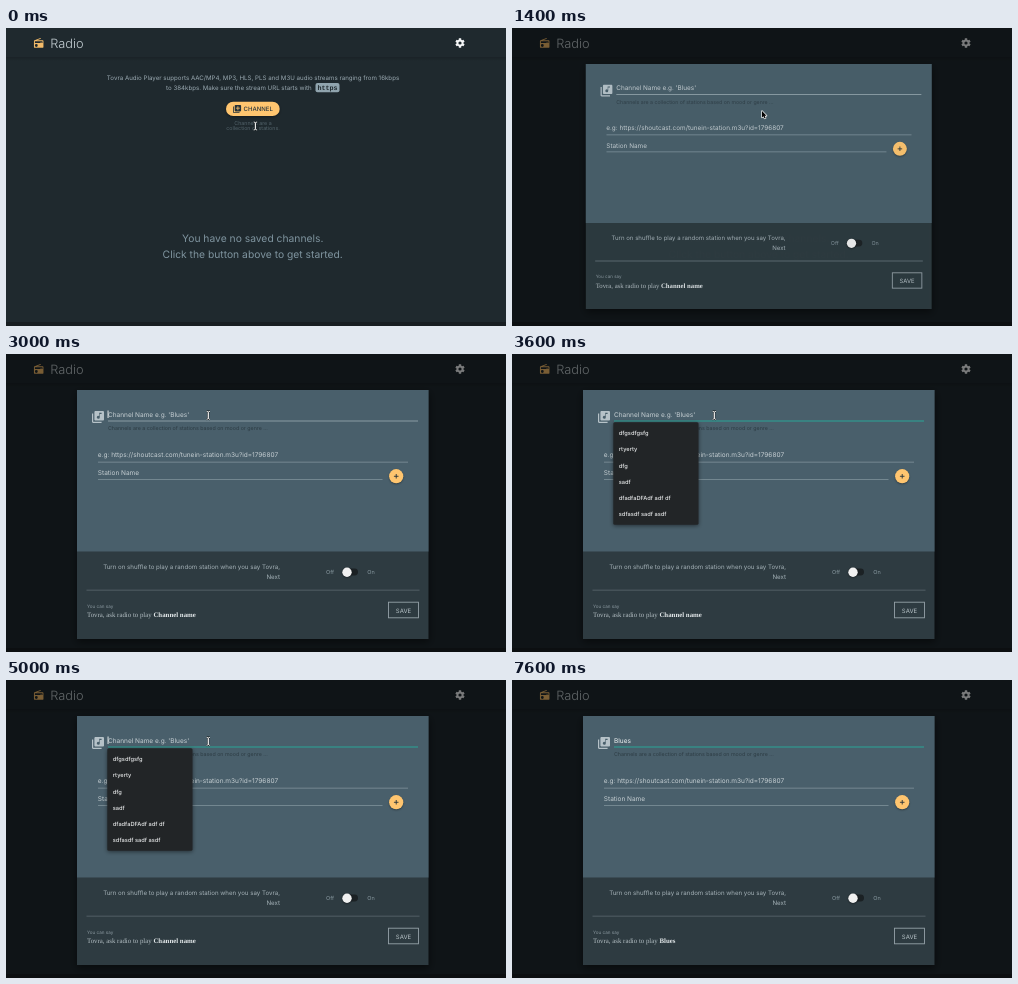
Recreate the animation shown at these times as an HTML page with a canvas. Size 500x298 px, loop 8 s.

```html
<!DOCTYPE html>
<html lang="en">
<head>
<meta charset="utf-8">
<title>Radio</title>
<style>
  html, body { margin: 0; width: 100%; height: 100%; overflow: hidden; background: #1f292e; }
  canvas { display: block; width: 500px; height: 298px; }
</style>
</head>
<body>
<canvas id="stage"></canvas>
<script>
const W = 500, H = 298, LOOP = 8000, STEP = 200;
const SANS = 'Inter, sans-serif';
const SERIF = '"Liberation Serif", serif';
const MONO = '"Liberation Mono", monospace';
const AMBER = '#ffc56f';

const canvas = document.getElementById('stage');
const ctx = canvas.getContext('2d');
const dpr = window.devicePixelRatio || 1;
canvas.width = Math.round(W * dpr);
canvas.height = Math.round(H * dpr);
ctx.textRendering = 'geometricPrecision';

const icons = {
  radio: 'M3.2 6.2C2.5 6.4 2 7.2 2 8v12c0 1.1.9 2 2 2h16c1.1 0 2-.9 2-2V8c0-1.1-.9-2-2-2H8.3l8.3-3.3L15.9 1zM7 20a3 3 0 1 1 0-6 3 3 0 0 1 0 6zm13-8h-2v-2h-2v2H4V8h16z',
  add: 'M4 6H2v14c0 1.1.9 2 2 2h14v-2H4zm16-4H8c-1.1 0-2 .9-2 2v12c0 1.1.9 2 2 2h12c1.1 0 2-.9 2-2V4c0-1.1-.9-2-2-2zm-1 9h-4v4h-2v-4H9V9h4V5h2v4h4z',
  music: 'M4 6H2v14c0 1.1.9 2 2 2h14v-2H4zm16-4H8c-1.1 0-2 .9-2 2v12c0 1.1.9 2 2 2h12c1.1 0 2-.9 2-2V4c0-1.1-.9-2-2-2zm-2 5h-3v5.5a2.5 2.5 0 1 1-1-2V5h4z',
  arrow: 'M0 0v9l2-1.8 1.5 3.2 1.6-.7-1.5-3.1h2.8z'
};
for (const name in icons) icons[name] = new Path2D(icons[name]);

function text(str, x, y, size, color, { align = 'left', weight = 400, family = SANS } = {}) {
  ctx.font = `${weight} ${size}px ${family}`;
  ctx.textAlign = align;
  ctx.fillStyle = color;
  ctx.fillText(str, x, y);
  return ctx.measureText(str).width;
}

function rect(x, y, w, h, color, radius = 0) {
  ctx.fillStyle = color;
  ctx.beginPath();
  ctx.roundRect(x, y, w, h, radius);
  ctx.fill();
}

function disc(x, y, r, color) {
  ctx.fillStyle = color;
  ctx.beginPath();
  ctx.arc(x, y, r, 0, Math.PI * 2);
  ctx.fill();
}

function icon(name, x, y, size, color) {
  ctx.save();
  ctx.translate(x, y);
  ctx.scale(size / 24, size / 24);
  ctx.fillStyle = color;
  ctx.fill(icons[name], 'evenodd');
  ctx.restore();
}

function shadow(blur, dy, color, draw) {
  ctx.save();
  ctx.shadowBlur = blur * dpr;
  ctx.shadowOffsetY = dy * dpr;
  ctx.shadowColor = color;
  draw();
  ctx.restore();
}

function gear(x, y, color) {
  const teeth = 6;
  ctx.beginPath();
  for (let i = 0; i < teeth; i++) {
    const a = i * Math.PI * 2 / teeth;
    for (const [da, r] of [[-.38, 3.5], [-.24, 4.8], [.24, 4.8], [.38, 3.5]]) {
      ctx.lineTo(x + r * Math.cos(a + da + Math.PI / 6 * 3), y + r * Math.sin(a + da + Math.PI / 6 * 3));
    }
  }
  ctx.closePath();
  ctx.moveTo(x + 1.6, y);
  ctx.arc(x, y, 1.6, 0, Math.PI * 2);
  ctx.fillStyle = color;
  ctx.fill('evenodd');
}

function drawPage() {
  rect(0, 0, W, H, '#1f292e');
  const fade = ctx.createLinearGradient(0, 29, 0, 33);
  fade.addColorStop(0, 'rgba(0,0,0,.16)');
  fade.addColorStop(1, 'rgba(0,0,0,0)');
  rect(0, 29, W, 4, fade);
  rect(0, 294, W, 4, '#181e22');

  icon('radio', 27, 9.4, 11.4, '#f3bb69');
  text('Radio', 44.3, 19.5, 12.8, '#c3cdd2', { weight: 300 });
  gear(454, 15, '#f4f6f7');

  const center = { align: 'center' };
  text('Tovra Audio Player supports AAC/MP4, MP3, HLS, PLS and M3U audio streams ranging from 16kbps',
    247, 52, 6.18, '#9aa9b1', center);
  text('to 384kbps. Make sure the stream URL starts with', 160, 62, 6.18, '#9aa9b1');
  rect(309.5, 55, 24, 9.3, '#90a4ae', 2);
  text('https', 321.5, 62, 6.7, '#1f292e', { align: 'center', weight: 700, family: MONO });

  shadow(3, 1, 'rgba(0,0,0,.4)', () => rect(220, 73.7, 53.7, 14.4, AMBER, 7.2));
  icon('add', 226.3, 76.2, 9.6, '#263238');
  text('CHANNEL', 237.6, 83.2, 6, '#2b363b', { weight: 500 });
  text('Channels are a', 247, 97.3, 5.3, '#53636b', center);
  text('collection of stations.', 247, 102, 5.3, '#53636b', center);

  text('You have no saved channels.', 246.7, 213.5, 10.3, '#7f949f', center);
  text('Click the button above to get started.', 246.7, 230, 10.3, '#7f949f', center);
}

function drawDialog(state) {
  shadow(8, 3, 'rgba(0,0,0,.5)', () => rect(71, 36, 351.5, 249, '#2e3b41'));
  rect(71, 36, 351.5, 161.5, '#495f6b');

  icon('music', 84.8, 55.8, 14.4, '#b6c2c8');
  let caretX = 102;
  if (state.value) {
    caretX += text(state.value, 102, 62.6, 6.5, '#f2f5f6') + .3;
  } else {
    text("Channel Name e.g. 'Blues'", 102, 62.6, 6.5, '#c6cfd3');
  }
  if (state.caret) rect(caretX - .4, 56.5, .9, 7.5, '#f2f5f6');
  rect(102, 66.5, 310, 1, state.focused ? '#2ba598' : '#8a9ba4');
  text('Channels are a collection of stations based on mood or genre ...', 102, 76.4, 5.3, '#2d3c44');

  text('e.g: https://shoutcast.com/tunein-station.m3u?id=1796807', 91.8, 103.3, 6.5, '#c6cfd3');
  rect(92, 107.7, 310, .8, '#82949d');
  text('Station Name', 91.8, 120.9, 6.5, '#c6cfd3');
  rect(92, 125, 284.5, .8, '#82949d');

  shadow(2, 1, 'rgba(0,0,0,.35)', () => disc(390.2, 122.2, 7.1, AMBER));
  rect(387.9, 121.8, 4.6, .9, '#263238');
  rect(389.75, 119.9, .9, 4.6, '#263238');

  text('Turn on shuffle to play a random station when you say Tovra,', 274, 214.6, 6.15, '#a5b2b8', { align: 'right' });
  text('Next', 274, 224.6, 6.15, '#a5b2b8', { align: 'right' });
  text('Off', 320, 220, 5.5, '#84949c');
  rect(336.5, 214.6, 15.5, 6.8, '#1b2124', 3.4);
  shadow(2, .7, 'rgba(0,0,0,.5)', () => disc(341, 218.2, 4.7, '#f1f1f1'));
  text('On', 361.3, 220, 5.5, '#84949c');
  rect(80.5, 235.8, 333, .8, '#5c6a71');

  text('You can say', 81, 253.8, 4.6, '#8c9aa1');
  const lead = text('Tovra, ask radio to play ', 81, 263.4, 6.85, '#b4bfc4', { family: SERIF });
  text(state.value || 'Channel name', 81 + lead, 263.4, 6.85, '#e3e8ea', { weight: 700, family: SERIF });

  ctx.strokeStyle = '#94a1a7';
  ctx.lineWidth = .9;
  ctx.strokeRect(382.5, 248.2, 30, 15.6);
  text('SAVE', 397.5, 258.6, 6, '#b9c4c9', { align: 'center' });
}

function drawSuggestions() {
  shadow(4, 1, 'rgba(0,0,0,.5)', () => rect(101.3, 68.2, 85.2, 102.6, '#222527', 1.5));
  ['dfgsdfgsfg', 'rtyerty', 'dfg', 'sadf', 'dfadfaDFAdf adf df', 'sdfasdf sadf asdf'].forEach((item, i) =>
    text(item, 106.8, 81.4 + i * 16.05, 5.7, '#e6e8e9', { weight: 500 }));
}

function drawArrow(x, y) {
  ctx.save();
  ctx.translate(x, y);
  ctx.scale(.72, .72);
  ctx.lineJoin = 'round';
  ctx.lineWidth = 1.8;
  ctx.strokeStyle = '#fff';
  ctx.stroke(icons.arrow);
  ctx.fillStyle = '#000';
  ctx.fill(icons.arrow);
  ctx.restore();
}

function drawIBeam(x, y) {
  const path = new Path2D(`M${x - 1.7} ${y - 4}q1.7 0 1.7 1.2v5.6q0 1.2-1.7 1.2M${x + 1.7} ${y - 4}q-1.7 0-1.7 1.2v5.6q0 1.2 1.7 1.2`);
  for (const [width, color] of [[2, '#11181b'], [.9, '#f4f4f4']]) {
    ctx.lineWidth = width;
    ctx.strokeStyle = color;
    ctx.stroke(path);
  }
}

function glide(t, start, end, from, to) {
  const p = Math.min(1, Math.max(0, (t - start) / (end - start)));
  const e = p * p * (3 - 2 * p);
  return from.map((v, i) => v + (to[i] - v) * e);
}

function drawCursor(t) {
  if (t >= 5200) return;
  const [x, y] = t < 1400
    ? glide(t, 0, 1200, [249.4, 98], [250, 83])
    : glide(t, 2000, 3000, [250, 83], [202.3, 61.3]);
  const overText = t < 1400 ? y > 91 : y < 67;
  (overText ? drawIBeam : drawArrow)(x, y);
}

// The last entry at or before t wins.
const at = (track, t) => track.reduce((value, [time, next]) => t >= time ? next : value, track[0][1]);

const typed = [[0, ''], [5200, 'B'], [6000, 'Bl'], [6600, 'Blu'], [6800, 'Blue'], [7200, 'Blues']];
const caret = [[0, false], [3000, true], [3600, false], [4000, true], [4600, false], [5000, true],
  [5800, false], [6000, true], [7600, false]];
const zoom = [[1400, .984], [1600, .997], [1800, 1]];
const opacity = [[1400, .95], [1600, .99], [1800, 1]];

function render(t) {
  ctx.setTransform(dpr, 0, 0, dpr, 0, 0);
  drawPage();
  if (t >= 1400) {
    rect(0, 0, W, H, 'rgba(0,0,0,.5)');
    const scale = at(zoom, t);
    ctx.save();
    ctx.globalAlpha = at(opacity, t);
    ctx.translate(246.8, 36);
    ctx.scale(scale, scale);
    ctx.translate(-246.8, -36);
    drawDialog({ value: at(typed, t), caret: at(caret, t), focused: t >= 3200 });
    ctx.restore();
    if (t >= 3200 && t < 5200) drawSuggestions();
  }
  drawCursor(t);
}

const begin = performance.now();
function tick() {
  const t = (performance.now() - begin) % LOOP;
  render(Math.floor(t / STEP) * STEP);
  requestAnimationFrame(tick);
}
tick();
</script>
</body>
</html>
```
